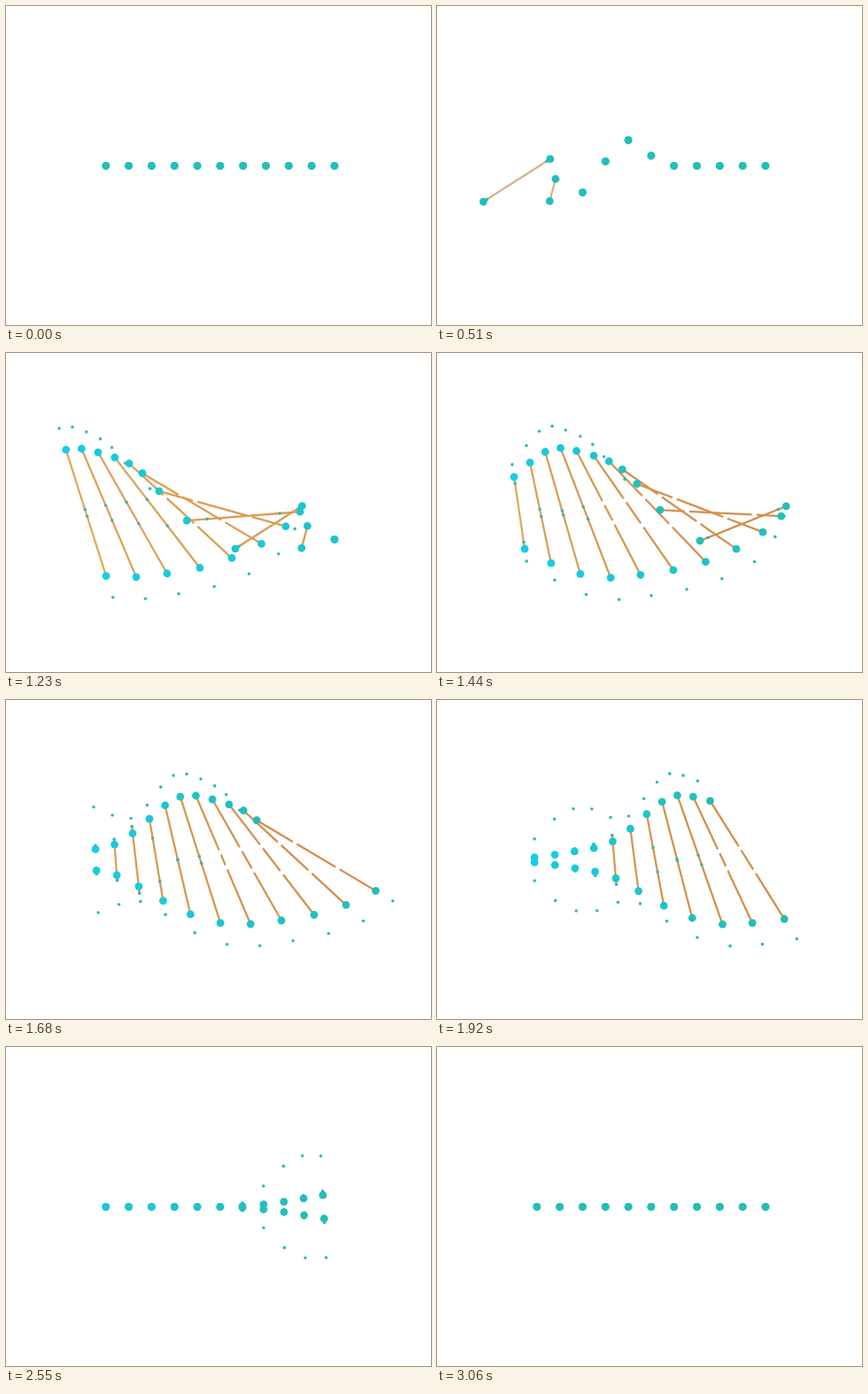
Write an HTML page with a canvas that moves like this. It is 480 by 360 pixels and loops after 3090 ms.

```html
<!DOCTYPE html>
<html lang="en">
<head>
<meta charset="utf-8">
<title>Twisting dots</title>
<style>
html, body { margin: 0; width: 100%; height: 100%; overflow: hidden; background: #fff; }
canvas { display: block; }
</style>
</head>
<body>
<canvas id="stage" width="480" height="360"></canvas>
<script>
const ctx = document.getElementById('stage').getContext('2d');
const LOOP = 3090, STEP = 30, COLUMNS = 11, DELAY = 90;
const TEAL = [32, 191, 190], CYAN = [20, 206, 226], SEA = [36, 189, 182];
const TAN = [212, 180, 140], GOLD = [224, 169, 92], ORANGE = [211, 142, 74];

const ramp = (a, b, t) => Math.min(1, Math.max(0, (t - a) / (b - a)));
const smooth = (a, b, t) => {
  const x = ramp(a, b, t);
  return x * x * (3 - 2 * x);
};
const mix = (a, b, f) => a.map((v, i) => v + (b[i] - v) * f);
const rgb = c => `rgb(${c.map(Math.round)})`;

// Height of a column's centre: up, down, then a soft overshoot.
const hops = [[0, 0], [140, -29], [160, -29], [345, 31], [725, -5.5], [990, 0]];
const lift = u => hops.slice(1).reduce(
  (y, [t, v], i) => y + (v - hops[i][1]) * smooth(hops[i][0], t, u), 0);

const goHome = u => 1 - smooth(1260, 2100, u);

function drift(u) {
  const sway = 3.5 * Math.sin(2 * Math.PI * ramp(360, 1080, u));
  return goHome(u) * (-22.4 * smooth(345, 560, u) - sway);
}

// Half the rod's length: opens fast, then drops and shrinks away.
function reach(u) {
  const open = 1 - (1 - ramp(392, 875, u)) ** 3;
  return open * (54.7 * (1 - smooth(1150, 1640, u)) + 24 * goHome(u));
}

// Half a turn along cubic-bezier(.087, 0, 0, 1), solved by bisection.
function angle(u) {
  const x = ramp(360, 1995, u);
  let lo = 0, hi = 1;
  for (let n = 0; n < 20; n++) {
    const s = (lo + hi) / 2;
    if (3 * (1 - s) ** 2 * s * 0.087 + s ** 3 < x) lo = s; else hi = s;
  }
  return Math.PI * (smooth(0, 1, lo) - 0.5);
}

// Small dots, as distances from the rod's centre.
const inner = (u, len) => len * ((1 - 0.6 * smooth(430, 730, u)) * (1 - ramp(720, 1310, u))
  + 1.34 * smooth(1320, 1530, u));
const outer = (u, len) => len * (1 + 0.337 * smooth(560, 850, u))
  + 45 * (smooth(1430, 1710, u) - smooth(1755, 2060, u));

function dot(x, y, r, color) {
  ctx.fillStyle = color;
  ctx.beginPath();
  ctx.arc(x, y, r, 0, 2 * Math.PI);
  ctx.fill();
}

function column(i, u, rodColor, color) {
  const x = 112.8 + 25.82 * i + drift(u), y = 180.4 + lift(u);
  const len = reach(u), turn = angle(u), dx = Math.cos(turn), dy = Math.sin(turn);
  const near = inner(u, len), far = outer(u, len);
  const split = i > 3 && u > 600 && u < 1155;

  // Both helpers take distances along the rod.
  const part = (p, q) => {
    ctx.strokeStyle = rodColor;
    ctx.beginPath();
    ctx.moveTo(x + dx * p, y + dy * p);
    ctx.lineTo(x + dx * q, y + dy * q);
    ctx.stroke();
  };
  const pair = (d, r, c) => [-d, d].forEach(p => dot(x + dx * p, y + dy * p, r, c));

  if (u > 392 && u < 1650) {
    const gap = split ? 2.6 : 0;
    part(-len, -near - gap);
    part(gap - near, near - gap);
    part(near + gap, len);
  }
  if (!split) pair(near, 1.8, 'rgb(62,180,172)');
  pair(far, 1.8, 'rgb(48,186,186)');
  pair(len, 4.4, color);
}

function draw(now) {
  const t = Math.floor(now % LOOP / STEP) * STEP;
  const glow = smooth(510, 990, t), fade = smooth(990, 1440, t);
  const left = mix(TEAL, CYAN, glow - smooth(2160, 3060, t));
  const right = mix(mix(TEAL, CYAN, glow), SEA, fade);
  const rod = mix(TAN, GOLD, glow);
  ctx.fillStyle = '#fff';
  ctx.fillRect(0, 0, 480, 360);
  ctx.lineWidth = 2.3;
  for (let i = 0; i < COLUMNS; i++) {
    const f = i / (COLUMNS - 1);
    column(i, t - i * DELAY, rgb(mix(rod, ORANGE, fade * Math.sqrt(f))), rgb(mix(left, right, f)));
  }
}

const start = performance.now();
function tick() {
  draw(performance.now() - start);
  requestAnimationFrame(tick);
}
tick();
</script>
</body>
</html>
```
